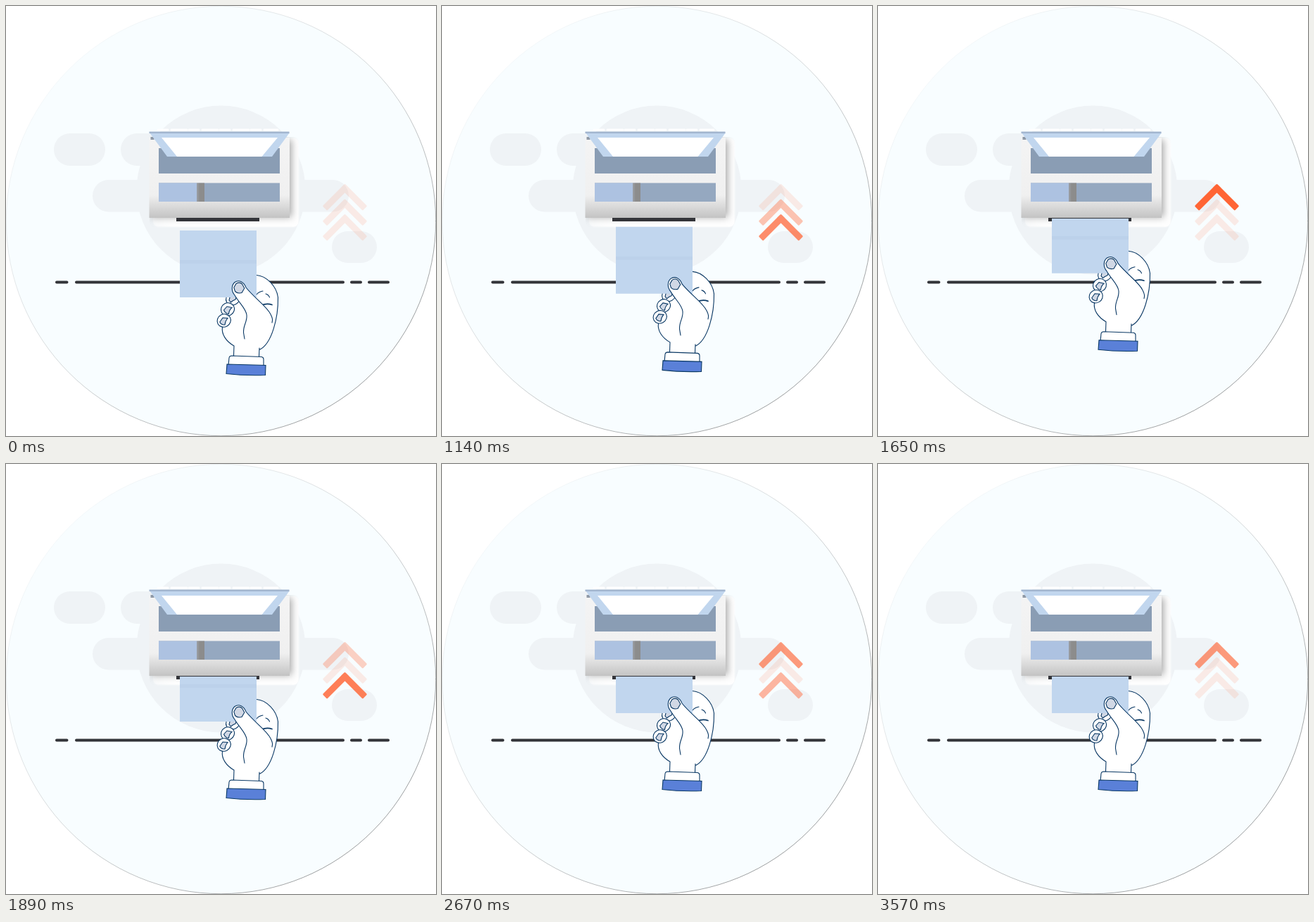
Animation, 611 px wide and 611 px high, one loop 3600 ms. Source, as an HTML page with a canvas:

```html
<!DOCTYPE html>
<html lang="en">
<head>
<meta charset="utf-8">
<title>Paper feed</title>
<style>
  html, body { margin: 0; width: 100%; height: 100%; overflow: hidden; background: #fff; }
  canvas { display: block; width: 611px; height: 611px; }
</style>
</head>
<body>
<canvas id="stage" width="611" height="611"></canvas>
<script>
const ctx = document.getElementById('stage').getContext('2d');
const LOOP = 3600, STEP = 30;
const INK = '#0a3864', DARK = '#333439', CLOUD = '#eff3f6', PAPER = '#c1d6ee', NAIL = '#d1d8e5';

const clamp = (v, lo, hi) => Math.min(hi, Math.max(lo, v));

function rect(x, y, w, h, fill, radius = 0) {
  ctx.beginPath();
  ctx.roundRect(x, y, w, h, radius);
  ctx.fillStyle = fill;
  ctx.fill();
}

function disc(x, y, r, fill) {
  ctx.beginPath();
  ctx.arc(x, y, r, 0, Math.PI * 2);
  ctx.fillStyle = fill;
  ctx.fill();
}

function shape(d, fill, stroke, width = 1.1) {
  const path = new Path2D(d);
  if (fill) {
    ctx.fillStyle = fill;
    ctx.fill(path);
  }
  if (stroke) {
    ctx.strokeStyle = stroke;
    ctx.lineWidth = width;
    ctx.stroke(path);
  }
}

function gradient(x0, y0, x1, y1, ...stops) {
  const g = ctx.createLinearGradient(x0, y0, x1, y1);
  stops.forEach(([at, color]) => g.addColorStop(at, color));
  return g;
}

function drawBackdrop() {
  ctx.fillStyle = '#fff';
  ctx.fillRect(0, 0, 611, 611);
  disc(305.5, 305.5, 305.5, '#f8fdff');
  // Thin rim, darkest at the lower right
  ctx.strokeStyle = gradient(90, 90, 521, 521,
    [0, 'rgba(70,70,70,.04)'], [0.5, 'rgba(70,70,70,.3)'], [1, 'rgba(70,70,70,.75)']);
  ctx.lineWidth = 0.7;
  ctx.beginPath();
  ctx.arc(305.5, 305.5, 305.2, 0, Math.PI * 2);
  ctx.stroke();

  rect(68, 181, 73, 46, CLOUD, 23);
  rect(163, 181, 90, 46, CLOUD, 23);
  rect(123, 247, 364, 45.5, CLOUD, 22.7);
  rect(463, 320, 64, 45, CLOUD, 22.5);
  disc(305.5, 261.5, 120, CLOUD);

  ctx.lineCap = 'round';
  shape('M72 392.5H86.5M100 392.5H479M491 392.5H504M516 392.5H543', null, DARK, 4);
}

function drawPrinter() {
  // White halo with a soft shadow of the body inside it
  ctx.save();
  ctx.shadowColor = '#fff';
  ctx.shadowBlur = 3;
  rect(209, 188, 206.5, 125.5, gradient(204, 0, 250, 0,
    [0, 'rgba(255,255,255,.3)'], [1, '#fff']), 7);
  ctx.restore();
  ctx.setLineDash([14, 5, 22, 3]);
  shape('M216 176H386', null, '#fff', 3);
  ctx.setLineDash([]);

  ctx.save();
  ctx.beginPath();
  ctx.roundRect(204, 186, 212, 128, 7);
  ctx.clip();
  ctx.shadowColor = 'rgba(0,0,0,.34)';
  ctx.shadowBlur = 10;
  ctx.shadowOffsetX = 2.5;
  rect(203.5, 190, 199.5, 110, '#f2f2f2');
  ctx.restore();

  rect(203.5, 187, 199.5, 114, gradient(0, 187, 0, 301,
    [0, '#f4f4f4'], [0.72, '#f0f0f0'], [1, '#c3c3c3']));
  rect(205.5, 186, 5, 4, '#8f99a6');
  rect(217, 202, 172, 36, '#8a9db4');
  rect(217, 251.5, 172, 26.5, '#95a8c0');
  rect(217, 251.5, 54, 26.5, '#adc2e1');
  rect(271, 251.5, 11, 26.5, gradient(270, 0, 275, 0, [0, '#a0a5ad'], [1, '#8c8c8c']));

  shape('M204 180H403L378 214H229Z', PAPER);
  shape('M221 187H386L363.500 214H243Z', '#fff');
  rect(203.5, 178.5, 199, 2.5, '#a2b5cf');
  rect(242, 301, 118, 5, DARK);
}

function finger(x, y, rx, ry, nail) {
  ctx.beginPath();
  ctx.ellipse(x, y, rx, ry, -0.5, 0, Math.PI * 2);
  ctx.fillStyle = '#fff';
  ctx.fill();
  ctx.strokeStyle = INK;
  ctx.lineWidth = 1.1;
  ctx.stroke();
  shape(nail, NAIL, INK);
}

function drawPalm() {
  const back = 'M356 382.500C370 383.500 384.500 398 386.500 414C387 442 378 480 360 488.500';
  shape(back + 'L359.500 499H323.500L324 484C312 476 306 466 307.500 455L314 420L330 400Z', '#fff');
  shape(back + 'M360 486L359.500 498M323.500 497L324 483C312 476 306 466 307.500 456', null, INK);
  shape('M356 410Q359 406 365 405M369 409Q373 410 374.500 414', null, INK);
  shape('M363 425Q371 422 378 424.500', null, INK, 1.7);

  finger(322.3, 416, 10, 8.8, 'M317 418L318.500 412L328 412L326 417Q322 418.500 319.500 421Z');
  finger(315, 431, 9.7, 9, 'M309.500 432L314 427L321 428.500Q317 432 316.500 437.500Q311.500 437 309.500 432Z');
  finger(309.7, 447, 9.8, 9, 'M303.800 449L308 443L315 443.500Q311.500 447.500 311 453Q306 453.500 303.800 449Z');
}

function drawThumbAndCuff() {
  const front = 'M378 450C379 446 379 444 376 438C371 427 353 415 341 400' +
                'C338 392 331 388.500 325 392.500C320 397 320 405 325 411' +
                'C332 423 341 430 342 439C343 449 337 453 337.500 464L339 473';
  shape(front + 'L365 478Z', '#fff');
  shape(front, null, INK);
  shape('M323.800 400L327 394.500Q332 391.500 335.500 395L338.800 401L335 407.500Q329 409 325.500 405.500Z',
        NAIL, INK);

  shape('M316 511L317 500Q317.500 497 321 497L363 498.500Q366 499 366 502L366 512Z', '#fff', INK);
  shape('M314 509L369 510.500L368.500 524.500Q339 525.500 313 522.500Z', '#5a80d8', INK);
}

function drawPaperAndHand(rise) {
  ctx.save();
  ctx.translate(0, -rise);
  drawPalm();
  ctx.restore();

  const top = Math.max(302, 319 - rise), bottom = 414 - rise;
  rect(247, top, 109, bottom - top, PAPER);
  const fold = 361 - rise;
  if (fold > 304) rect(247, fold, 109, 5, '#bcd1ea');

  ctx.save();
  ctx.translate(0, -rise);
  drawThumbAndCuff();
  ctx.restore();
}

const chevron = (() => {
  const arm = new Path2D(), both = new Path2D();
  arm.roundRect(-4.6, -4.6, 45, 9.2, 1.5);
  both.addPath(arm, new DOMMatrix().rotate(45));
  both.addPath(arm, new DOMMatrix().rotate(135));
  return both;
})();

// Four triangular pulses, 900 ms apart; rising edges never start before time 0
function glow(t, firstPeak) {
  const FADE = 300, LOW = 0.12;
  let level = 0;
  for (let k = 0; k < 4; k++) {
    const peak = firstPeak + k * 900;
    const span = t < peak ? Math.min(FADE, peak) : FADE;
    level = Math.max(level, 1 - Math.abs(t - peak) / span);
  }
  return LOW + (1 - LOW) * level;
}

function drawArrows(t) {
  ctx.fillStyle = '#ff6535';
  [750, 450, 150].forEach((firstPeak, i) => {
    ctx.save();
    ctx.globalAlpha = glow(t, firstPeak);
    ctx.translate(481.5, 258.9 + i * 21.5);
    ctx.fill(chevron);
    ctx.restore();
  });
}

function render(t) {
  drawBackdrop();
  drawPrinter();
  drawPaperAndHand(60 * clamp((t - 1050) / 1050, 0, 1));
  drawArrows(t);
}

const start = performance.now();
function tick() {
  const t = (performance.now() - start) % LOOP;
  render(Math.floor(t / STEP) * STEP);
  requestAnimationFrame(tick);
}
tick();
</script>
</body>
</html>
```
